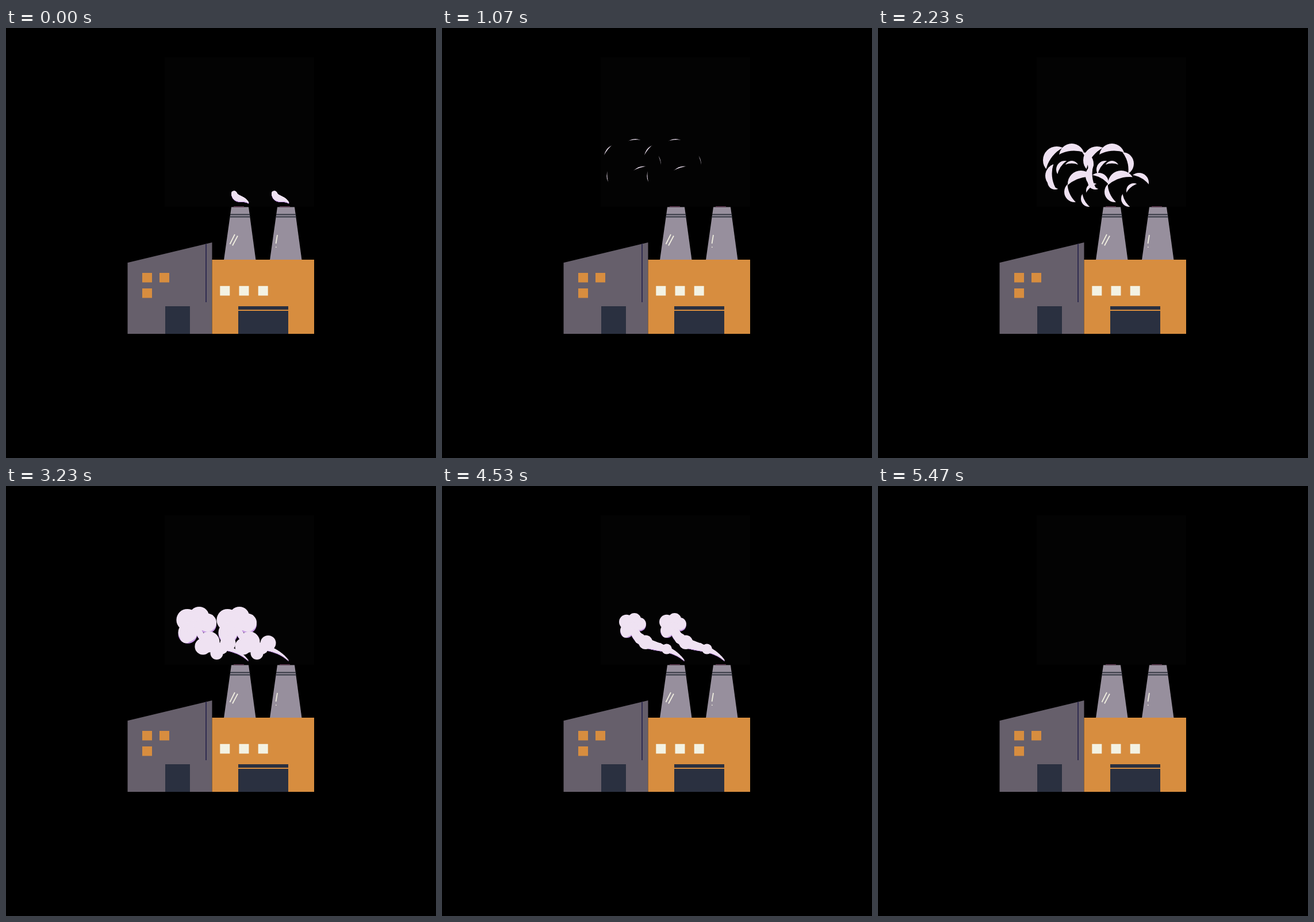
An HTML page with a canvas that plays this animation: 748 px wide and 748 px high, repeating every 5.61 s.

```html
<!DOCTYPE html>
<html lang="en">
<head>
<meta charset="utf-8">
<title>Factory</title>
<style>
  html, body { margin: 0; width: 100%; height: 100%; overflow: hidden; background: #000; }
  canvas { display: block; }
</style>
</head>
<body>
<canvas id="stage" width="748" height="748"></canvas>
<script>
const ctx = document.getElementById('stage').getContext('2d');
const LOOP = 5610, CYCLE = 1400;
const WHITE = '#efe2f2', PURPLE = '#c497e2';
const ORANGE = '#d78d3f', GREY = '#665f6b', DARK = '#2a3040', CREAM = '#f3f2e3', TOWER = '#978f9d';

// The head of the smoke leaves the wisp and settles at HOME
const START = [397, 288], HOME = [332, 244], NOZZLE = [422, 304];

// Full-grown puffs: x, y, radius, and the side (degrees) where the rim lasts longest
const HEAD = [
  [337, 223, 22, -95], [311, 230, 24, -142], [312, 257, 21, 175],
  [308, 268, 13, 130], [355, 236, 20, -15], [325, 246, 15, -145], [337, 243, 12, -90]
];
const TAIL = [
  [342, 285, 18, 155], [353, 271, 23, -108], [367, 297, 14, 150],
  [375, 283, 13, -130], [384, 269, 17, -60]
];

const lerp = (a, b, k) => a + (b - a) * k;
const mix = (p, q, k) => p.map((v, i) => lerp(v, q[i], k));
const ramp = (t, from, to) => Math.min(1, Math.max(0, (t - from) / (to - from)));

// Piecewise linear value through matching times and values
function track(t, times, values) {
  let v = values[0];
  for (let i = 1; i < times.length; i++) {
    v = lerp(v, values[i], ramp(t, times[i - 1], times[i]));
  }
  return v;
}

function disc(x, y, r) {
  ctx.beginPath();
  ctx.arc(x, y, r, 0, Math.PI * 2);
}

// Point at q on the S-shaped stem from the head (0) to the nozzle (1)
function stemAt(head, q) {
  const dx = NOZZLE[0] - head[0], dy = NOZZLE[1] - head[1], p = 1 - q;
  const bend = (a, b) => 3 * p * p * q * a + 3 * p * q * q * b + q * q * q;
  return [head[0] + dx * bend(.13, .65), head[1] + dy * bend(.75, .4)];
}

function drawStem(t, head, dy) {
  const width = track(t, [0, 330, 430, 570], [5.5, 8.5, 6, 0]);
  if (!width) return;
  for (let q = 0; q <= 1; q += .01) {
    const [x, y] = stemAt(head, q);
    const taper = (1 - q) ** .7 * (.75 + .5 * Math.sin(Math.PI * q));
    disc(x, y + dy, width * taper + .5);
    ctx.fill();
  }
}

// A hole slides in from behind the rim and leaves a thinning crescent
function drawPuff(t, x, y, size, [, , full, angle]) {
  const r = full * size;
  const ux = Math.cos(angle * Math.PI / 180), uy = Math.sin(angle * Math.PI / 180);
  const drift = ramp(t, 830, 1130) * (6 - 4 * uy);
  const lead = Math.max(0, 22 - full) * .02 * ramp(t, 600, 830);
  const rim = track(t, [600, 830, 1070, 1120], [2, .58, .07, 0]) - lead;
  if (rim <= 0) return;

  x += ux * drift;
  y += uy * drift;
  const gap = 2 * r;
  ctx.save();
  disc(x, y, r);
  ctx.clip();
  ctx.beginPath();
  ctx.rect(0, 0, 748, 748);
  if (rim < 2) ctx.arc(x - ux * gap, y - uy * gap, r + gap - rim * r, 0, Math.PI * 2);
  ctx.fill('evenodd');
  ctx.restore();
}

function plume(t, dx) {
  const head = mix(START, HOME, ramp(t, 0, 330));
  const size = track(t, [0, 330, 430, 560], [.1, .53, .79, 1]);
  const spread = track(t, [330, 430, 560], [0, .7, 1]);
  const headSpot = p => head.map((v, i) => v + (p[i] - HOME[i]) * size);

  ctx.save();
  ctx.translate(dx, 0);
  if (t < 600) {
    ctx.fillStyle = PURPLE;
    drawStem(t, head, 1.2);
    for (const p of [HEAD[2], HEAD[4]]) {
      const [x, y] = headSpot(p);
      disc(x, y + 4 * size, p[2] * size);
      ctx.fill();
    }
  }
  ctx.fillStyle = WHITE;
  drawStem(t, head, 0);
  for (const p of HEAD) drawPuff(t, ...headSpot(p), size, p);
  TAIL.forEach((p, i) => {
    const seat = stemAt(head, .22 + .12 * i);
    drawPuff(t, ...mix(seat, p, spread), size, p);
  });
  ctx.restore();
}

function poly(color, ...pts) {
  ctx.fillStyle = color;
  ctx.beginPath();
  pts.forEach(([x, y]) => ctx.lineTo(x, y));
  ctx.fill();
}

function box(color, x, y, w, h) {
  ctx.fillStyle = color;
  ctx.fillRect(x, y, w, h);
}

function glint(x1, y1, x2, y2) {
  ctx.strokeStyle = CREAM;
  ctx.lineWidth = 1.7;
  ctx.beginPath();
  ctx.moveTo(x1, y1);
  ctx.lineTo(x2, y2);
  ctx.stroke();
}

function tower(x) {
  poly(TOWER, [x + 13, 311.5], [x + 43, 311.5], [x + 55.5, 403.5], [x, 403.5]);
  box('#5d3850', x + 17, 310, 18, 1.5);
  box('#343843', x + 11, 323.5, 34.5, 2);
  box('#343843', x + 10.3, 327.5, 35.5, 2);
}

function factory() {
  tower(379);
  tower(459);
  glint(398, 359, 389.5, 376);
  glint(403, 361.5, 394, 378.5);
  glint(472, 360, 469.5, 375);
  box(CREAM, 469, 380.5, 1.5, 1.5);

  poly(GREY, [211.5, 408.3], [358.5, 373], [358.5, 532], [211.5, 532]);
  box('#302c50', 347, 375.5, 2, 101.5);
  box(ORANGE, 358.5, 403, 177.5, 129);

  for (const [x, y] of [[237, 426], [267, 426], [237, 453]]) box(ORANGE, x, y, 17, 16.5);
  for (let i = 0; i < 3; i++) box(CREAM, 372.3 + i * 33.2, 448.8, 17, 16.7);

  box(DARK, 277, 484, 43, 48);
  box(DARK, 404, 484, 87, 48);
  box(ORANGE, 404, 490, 87, 2);
}

function draw(now) {
  const t = now % LOOP;
  box('#000', 0, 0, 748, 748);
  box('#030303', 276, 51, 260, 260);
  factory();
  if (t < CYCLE * 4) {
    plume(t % CYCLE, 70);
    plume(t % CYCLE, 0);
  }
}

const begin = performance.now();
function tick() {
  draw(performance.now() - begin);
  requestAnimationFrame(tick);
}
tick();
</script>
</body>
</html>
```
